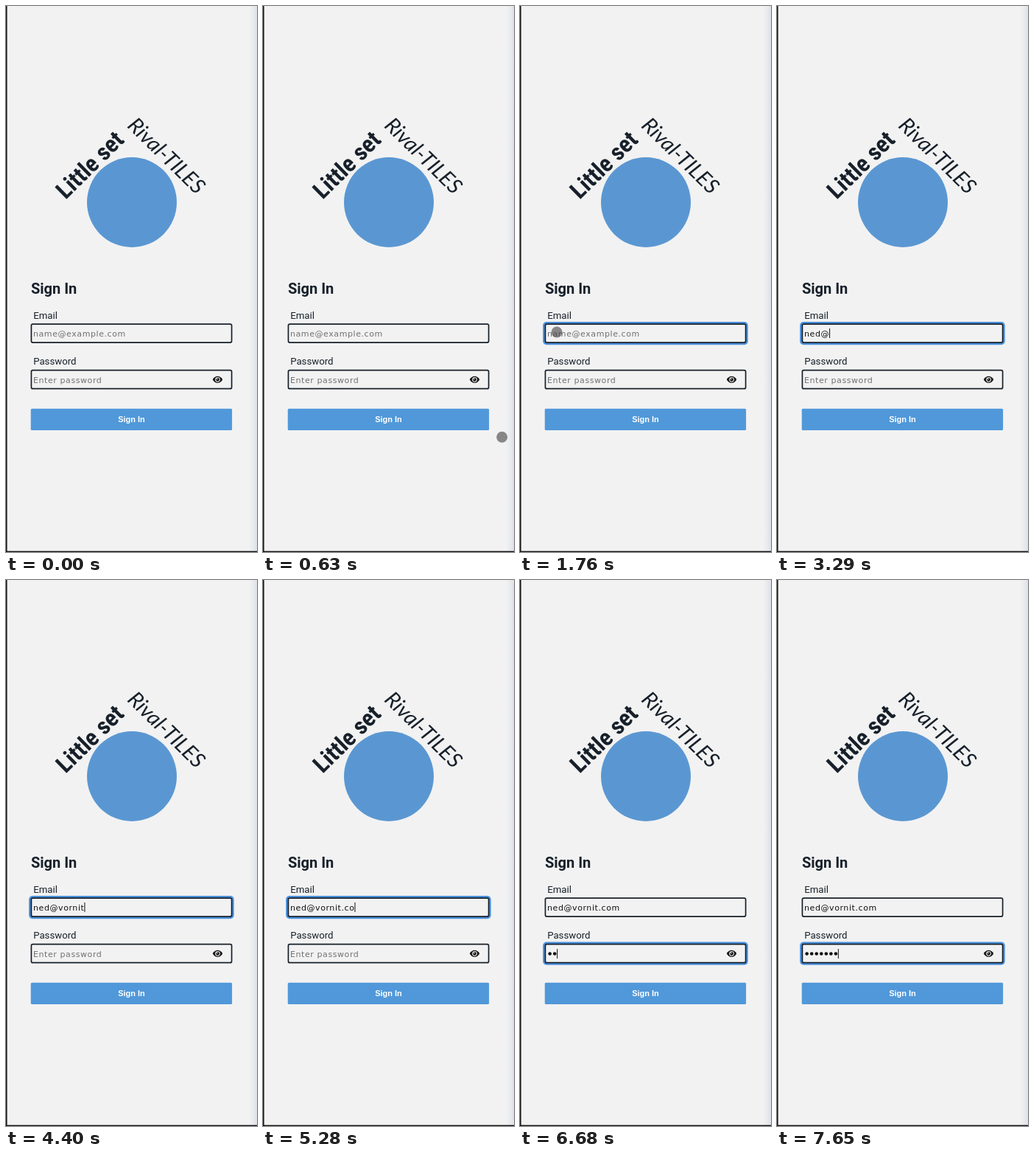
Recreate the animation shown at these times as an HTML page. Size 341 px wide and 740 px high, loop 8 s.

```html
<!DOCTYPE html>
<html lang="en">
<head>
<meta charset="utf-8">
<title>Sign In</title>
<style>
  html, body { margin: 0; width: 100%; height: 100%; overflow: hidden; background: #f2f2f2; }
  svg { display: block; width: 100vw; height: 100vh; }
  text { fill: #17202a; white-space: pre; }
  .head { font: 700 20px Roboto, sans-serif; }
  .label { font: 400 13.2px Roboto, sans-serif; }
  .input { font: 400 11px "DejaVu Sans", sans-serif; letter-spacing: .58px; fill: #111; }
  .hint { fill: #707070; }
  .button { font: 700 11px "Liberation Sans", Arial, sans-serif; fill: #fff; text-anchor: middle; }
  .bold { font-family: "Roboto Condensed", Roboto, sans-serif; font-weight: 700; font-stretch: 75%; }
  .loose { font-family: Lato, sans-serif; font-style: italic; }
  .field { fill: #f2f2f2; stroke: #17202a; stroke-width: 1.7; }
  .ring { fill: #4a90dc; }
</style>
</head>
<body>
<svg viewBox="0 0 341 740" preserveAspectRatio="none">
  <defs>
    <linearGradient id="shade">
      <stop offset="0" stop-color="#f2f2f2"/>
      <stop offset=".5" stop-color="#e9ebef"/>
      <stop offset="1" stop-color="#dde1e8"/>
    </linearGradient>
  </defs>
  <rect width="341" height="740" fill="#f2f2f2"/>
  <rect x="330" width="11" height="740" fill="url(#shade)"/>
  <rect width="1.5" height="740" fill="#111"/>
  <rect y="738.7" width="341" height="1.3" fill="#111"/>

  <circle cx="171" cy="266" r="61" fill="#5a97d2"/>
  <text id="titleA" class="bold" transform="translate(81 263) rotate(-44.5)">Little set</text>
  <text id="titleB" class="loose" transform="translate(163.5 163.5) rotate(44.3)">Rival-TILES</text>

  <text class="head" x="34" y="390">Sign In</text>

  <text class="label" x="37.2" y="423.7">Email</text>
  <rect id="mailRing" class="ring" x="31.1" y="428" width="278.6" height="31.2" rx="5"/>
  <rect class="field" x="34.4" y="431.1" width="272.2" height="25" rx="2"/>
  <text id="mailHint" class="input hint" x="37" y="447.6">name@example.com</text>
  <text id="mail" class="input" x="37" y="447.6"></text>

  <text class="label" x="37.2" y="486.2">Password</text>
  <rect id="passRing" class="ring" x="31.1" y="490.6" width="278.6" height="31.2" rx="5"/>
  <rect class="field" x="34.4" y="493.7" width="272.2" height="25" rx="2"/>
  <text id="passHint" class="input hint" x="37" y="510.6">Enter password</text>
  <g id="dots" fill="#111"></g>
  <g transform="translate(287.5 506.3)">
    <path d="M-6.7 0C-3.6-6.1 3.6-6.1 6.7 0C3.6 6.1-3.6 6.1-6.7 0Z" fill="#111"/>
    <circle r="3.4" fill="#f2f2f2"/>
    <circle r="2.4" fill="#111"/>
    <circle cx="-.9" cy="-.9" r=".9" fill="#f2f2f2"/>
  </g>

  <rect id="caret" width="1" height="13" fill="#111"/>

  <rect x="33.7" y="545.8" width="273.4" height="29.1" rx="1.5" fill="#5098d9"/>
  <text class="button" x="170.5" y="564.2">Sign In</text>

  <circle id="touch" r="7.5" fill="#454545" fill-opacity=".62"/>
</svg>
<script>
  const LOOP = 8000;
  const ADDRESS = "ned@vornit.com";
  const MAIL_KEYS = [2140, 2330, 2530, 3160, 3570, 3740, 3900, 4070, 4230, 4400, 4860, 5000, 5150, 5300];
  const PASS_KEYS = [6110, 6640, 6790, 6970, 7180, 7450, 7650];
  const MAIL_FOCUS = 1760, PASS_FOCUS = 5610;
  const DOT_STEP = 6.55;

  const el = id => document.getElementById(id);
  const show = (id, on) => el(id).setAttribute("visibility", on ? "visible" : "hidden");
  const place = (id, a, x, b, y) => { el(id).setAttribute(a, x); el(id).setAttribute(b, y); };
  const pressed = (keys, t) => keys.filter(k => t >= k).length;
  const part = (t, from, to) => Math.min(1, Math.max(0, (t - from) / (to - from)));
  const mix = (a, b, p) => a + (b - a) * p;

  // Pick the font size at which a title runs along its slanted edge.
  function sizeTitle(id, run, max) {
    const text = el(id);
    text.style.fontSize = "20px";
    text.style.fontSize = Math.min(max, 20 * run / text.getComputedTextLength()) + "px";
  }
  sizeTitle("titleA", 117, 32);
  sizeTitle("titleB", 133, 30);

  const dots = PASS_KEYS.map((_, i) => {
    const dot = document.createElementNS("http://www.w3.org/2000/svg", "circle");
    dot.setAttribute("cx", 40.6 + i * DOT_STEP);
    dot.setAttribute("cy", 506.5);
    dot.setAttribute("r", 2.3);
    el("dots").append(dot);
    return dot;
  });

  function draw(t) {
    const typed = pressed(MAIL_KEYS, t);
    const hidden = pressed(PASS_KEYS, t);
    const inPass = t >= PASS_FOCUS;

    show("mailRing", t >= MAIL_FOCUS && !inPass);
    show("passRing", inPass);
    show("mailHint", !typed);
    show("passHint", !hidden);
    el("mail").textContent = ADDRESS.slice(0, typed);
    dots.forEach((dot, i) => dot.setAttribute("visibility", i < hidden ? "visible" : "hidden"));

    show("caret", typed > 0);
    if (inPass) place("caret", "x", 37 + hidden * DOT_STEP, "y", 500);
    else if (typed) place("caret", "x", 37 + el("mail").getComputedTextLength(), "y", 437);

    const glide = 1 - (1 - part(t, 630, 880)) ** 3;
    const drift = part(t, 880, 1250);
    show("touch", t >= 630 && !typed);
    place("touch", "cx", mix(328, 47, glide) + 3 * drift, "cy", mix(586, 441, glide) + drift);
  }

  function tick() {
    draw(performance.now() % LOOP);
    requestAnimationFrame(tick);
  }
  tick();
</script>
</body>
</html>
```
